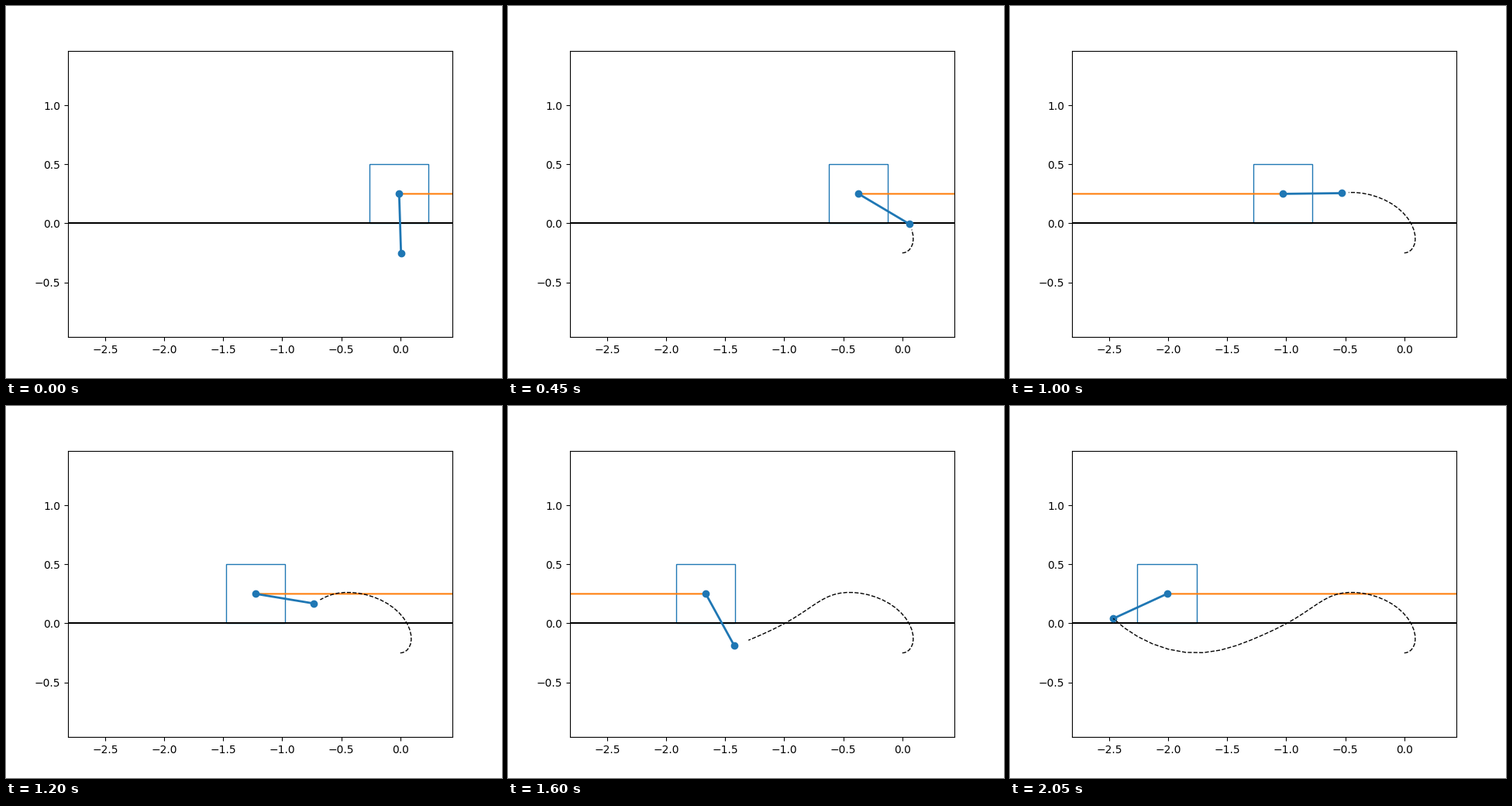
A matplotlib script for the animation above (3.3 s loop, 640 by 480 pixels).

```python
import numpy as np
import matplotlib.pyplot as plt
from matplotlib.animation import FuncAnimation
from matplotlib.patches import Rectangle

FRAMES, INTERVAL = 66, 50
LAST = 41                  # final simulation step, held to the end of the loop
SIDE = 0.5                 # cart side and pole length
PIVOT_Y = SIDE / 2
FLIPS = (16, 24, 30, 37)   # frames at which the thrust changes side

# Key poses: step, cart position, pole angle in degrees.
# The first one mirrors the third, so the motion starts from rest.
POSES = np.array([
    (-2, -0.0335, 6.3),
    (0, 0, 0),
    (2, -0.0335, 6.3),
    (5, -0.1345, 24.7),
    (10, -0.370, 59.3),
    (14, -0.600, 80.4),
    (21, -1.027, 90.7),
    (25, -1.224, 80.6),
    (29, -1.435, 59.3),
    (33, -1.664, 28.8),
    (37, -1.824, -20.3),
    (LAST, -2.010, -65.3),
])


def natural_spline(t, y, x):
    """Smooth curve through the points (t, y), evaluated at x."""
    def cubic(u):
        return np.abs(u[:, None] - t) ** 3

    def line(u):
        return np.column_stack([np.ones_like(u), u])

    a = np.block([[cubic(t), line(t)], [line(t).T, np.zeros((2, 2))]])
    rhs = np.vstack([y, np.zeros((2, y.shape[1]))])
    return np.hstack([cubic(x), line(x)]) @ np.linalg.solve(a, rhs)


times = np.arange(LAST + 1) / LAST
cart_x, angle = natural_spline(POSES[:, 0] / LAST, POSES[:, 1:], times).T
theta = np.radians(angle)
tip_x = cart_x + SIDE * np.sin(theta)
tip_y = PIVOT_Y - SIDE * np.cos(theta)

fig, ax = plt.subplots(figsize=(6.4, 4.8), dpi=100)
ax.set_xlim(-2.8141, 0.4414)
ax.set_ylim(-0.9629, 1.4629)
ax.axhline(0, color="black", lw=1.5)

cart = ax.add_patch(Rectangle((0, 0), SIDE, SIDE, fill=False, ec="C0", lw=1))
thrust, = ax.plot([], [], color="C1", lw=1.5, snap=False)
pole, = ax.plot([], [], "o-", color="C0", lw=2)
trail, = ax.plot([], [], "k--", lw=1)


def update(frame):
    s = min(frame + 1, LAST)
    x = cart_x[s]
    side = (-1) ** sum(frame >= f for f in FLIPS)
    cart.set_x(x - SIDE / 2)
    thrust.set_data([x, x + 5 * side], [PIVOT_Y, PIVOT_Y])
    pole.set_data([x, tip_x[s]], [PIVOT_Y, tip_y[s]])
    trail.set_data(tip_x[:frame + 1], tip_y[:frame + 1])
    return cart, thrust, pole, trail


anim = FuncAnimation(fig, update, frames=FRAMES, interval=INTERVAL,
                     repeat=True, repeat_delay=0)
plt.show()
```
